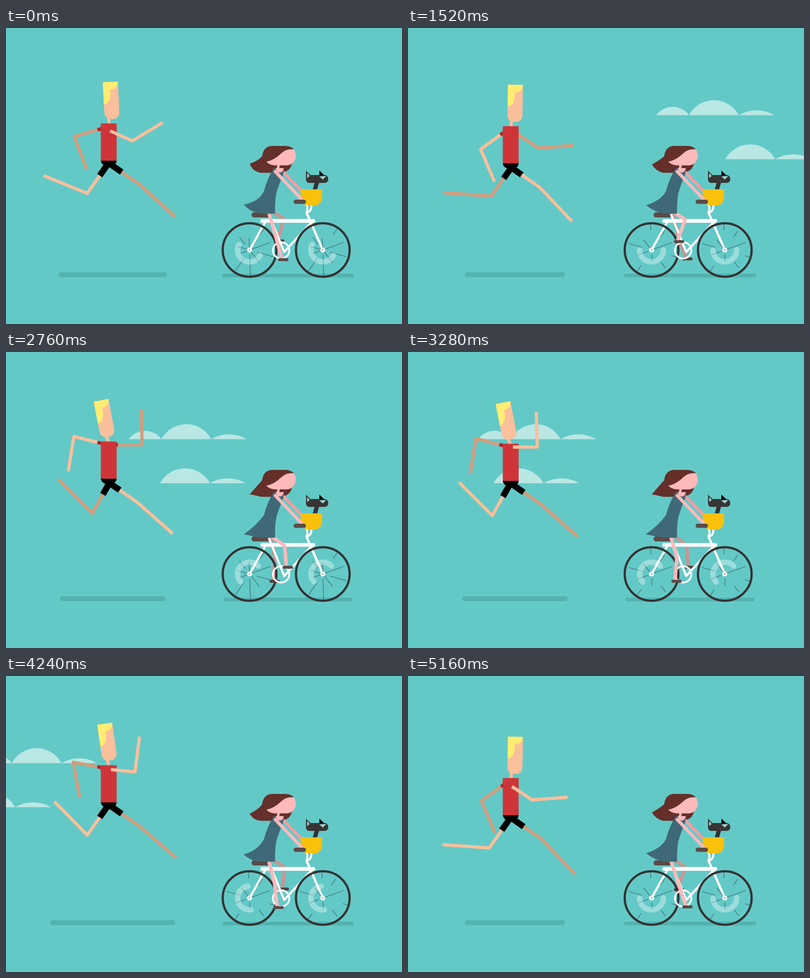
Write an HTML page with a canvas that moves like this. It is 800 by 600 pixels and loops after 5200 ms.

```html
<!DOCTYPE html>
<html lang="en">
<head>
<meta charset="utf-8">
<title>Runner and cyclist</title>
<style>
html, body { margin: 0; height: 100%; overflow: hidden; background: #63c9c7; }
canvas { display: block; }
</style>
</head>
<body>
<canvas id="stage" width="800" height="600"></canvas>
<script>
const g = document.getElementById('stage').getContext('2d');
const TAU = Math.PI * 2, LOOP = 5200, STRIDE = 1040, HALF = STRIDE / 2, STEP = 40;
const mod = (a, n) => ((a % n) + n) % n;
const rad = d => d * Math.PI / 180;
const clamp = (v, lo = -1, hi = 1) => Math.min(hi, Math.max(lo, v));
const wave = (t, peak, period = STRIDE) => Math.cos((t - peak) / period * TAU);
const pulse = (t, peak, power) => Math.max(0, wave(t, peak)) ** power;
// Point at a distance and an angle; 0 degrees hangs down, 90 points forward.
const reach = ([x, y], len, deg) => [x + len * Math.sin(rad(deg)), y + len * Math.cos(rad(deg))];

function line(points, color, width, cap = 'butt') {
  g.beginPath();
  points.forEach(p => g.lineTo(p[0], p[1]));
  g.strokeStyle = color;
  g.lineWidth = width;
  g.lineCap = cap;
  g.lineJoin = 'round';
  g.stroke();
}
function shape(d, color) {
  g.fillStyle = color;
  g.fill(new Path2D(d));
}
function pill(x, y, w, h, color, r = h / 2) {
  g.beginPath();
  g.roundRect(x, y, w, h, r);
  g.fillStyle = color;
  g.fill();
}
function ring(x, y, r, color, width, from = 0, to = TAU) {
  g.beginPath();
  g.arc(x, y, r, from, to);
  g.strokeStyle = color;
  g.lineWidth = width;
  g.lineCap = 'round';
  g.stroke();
}
function disc(x, y, r, color) {
  g.beginPath();
  g.arc(x, y, r, 0, TAU);
  g.fillStyle = color;
  g.fill();
}

function cloud(x, base, bumps) {
  g.fillStyle = '#b9e7e4';
  for (const [w, h] of bumps) {
    const c = w / 2, r = (c * c + h * h) / (2 * h), a = Math.asin(c / r);
    g.beginPath();
    g.arc(x + c, base + r - h, r, -Math.PI / 2 - a, -Math.PI / 2 + a);
    g.fill();
    x += w;
  }
}

const SKIN = '#fabf9b', SKIN_FAR = '#d39c7c', SHIRT = '#cf3538', SHIRT_FAR = '#a9262c';

// Height of the shoulder line: long in the air, short on the ground.
const bodyY = t => 208.5 - 31.5 * wave(t, 92, HALF) + 3.2 * (wave(t, 92, HALF / 2) - 1) + 4 * wave(t, 0);

function runnerLeg(t, y, near) {
  const thigh = 10 - 45 * clamp(1.75 * wave(t, 0) - .12);
  const shin = -45 - 95 * wave(t, 130) + 58 * pulse(t, 380, 2);
  const hip = [near ? 206 : 210, y + 82];
  const knee = reach(hip, 73, thigh), foot = reach(knee, 95, shin);
  const blurred = Math.abs(mod(t, STRIDE) - 360) < STEP * 1.5;
  if (blurred) {
    const rgb = near ? '250,191,155' : '211,150,120';
    const fade = g.createLinearGradient(knee[0] - 125, knee[1] + 8, knee[0], knee[1] + 48);
    fade.addColorStop(0, `rgba(${rgb},0)`);
    fade.addColorStop(1, `rgba(${rgb},.88)`);
    g.beginPath();
    g.moveTo(...knee);
    g.lineTo(...foot);
    g.lineTo(foot[0] - 130, foot[1] - 51);
    g.lineTo(knee[0] - 115, knee[1] - 33);
    g.fillStyle = fade;
    g.fill();
  }
  line(blurred ? [hip, knee] : [hip, knee, foot], near ? SKIN : SKIN_FAR, 6.5, near ? 'butt' : 'round');
  line([hip, reach(hip, 29, thigh)], '#000', 12.5);
}

function runnerArm(t, y, near, overShirt = false) {
  const upper = -8 + 99 * wave(t, 140) + 44 * pulse(t, 880, 3);
  const bend = 64 + 37 * wave(t, 105, HALF) - 20 * wave(t, -20) ** 3;
  const swing = clamp(upper / 70);
  if (near && overShirt !== swing > 0) return;
  const shoulder = [near ? 198 - 7 * swing : 205, y + 7 * Math.abs(swing)];
  const elbow = reach(shoulder, 70, upper);
  const sleeve = reach(shoulder, 21, upper);
  line([sleeve, elbow, reach(elbow, 69, upper + bend)], near ? SKIN : SKIN_FAR, 6.5, 'round');
  line([shoulder, sleeve], overShirt ? SHIRT : SHIRT_FAR, 7);
}

function runnerHead(t, y) {
  const u = mod(t - 480, HALF) / HALF;
  const tilt = 1 - 14 * (1 - (1 - u) ** 4) * Math.min(1, (1 - u) * 5);
  const chin = 211 + 5 * wave(t, 455, HALF);
  const chinY = y - 9.5 + 3 * (y - 178) / 63;
  line([[208, y + 2], [chin - 6.5, chinY - 5]], SKIN, 6);
  g.save();
  g.translate(chin, chinY);
  g.rotate(rad(tilt));
  shape('M-15.2-75.5H15.2V-15Q15.2 0 0 0Q-15.2 0-15.2-15Z', SKIN);
  shape('M-15.2-75.5H15.2Q14-60-1-60V-50Q-3-33-15.2-30Z', '#ffec73');
  g.restore();
}

function runner(t) {
  const y = bodyY(t);
  runnerArm(t + HALF, y, false);
  runnerLeg(t + HALF, y, false);
  runnerLeg(t, y, true);
  runnerArm(t, y, true);
  shape(`M191.5 ${y + 75}H223.5Q223 ${y + 86} 207 ${y + 87}Q193 ${y + 86} 191.5 ${y + 75}`, '#000');
  runnerHead(t, y);
  g.fillStyle = SHIRT;
  g.fillRect(191.5, y, 32, 75.5);
  runnerArm(t, y, true, true);
}

// Repeatable pseudo-random value from 0 to 1.
function noise(n) {
  const v = Math.sin(n * 12.9898) * 43758.5453;
  return v - Math.floor(v);
}

function wheel(x, t) {
  const y = 450, turn = rad(117 + t / HALF * 360);
  const set = Math.round(t / STEP) % 7 % 2;
  for (let i = 0; i < 10; i++) {
    const n = i + set * 10, deg = 182 - i * 36;
    const from = Math.max(0, 60 * noise(n) - 18);
    const to = Math.min(52, from + 12 + 40 * noise(n + 50));
    line([reach([x, y], from, deg), reach([x, y], to, deg)], 'rgba(50,70,75,.5)', 1.7);
  }
  ring(x, y, 24, 'rgba(255,255,255,.36)', 11, turn - Math.PI / 2, turn + Math.PI / 2);
  ring(x, y, 54.2, '#333', 4.5);
  disc(x, y, 5, '#fff');
  disc(x, y, 1.3, '#8b7772');
}

function cyclistLeg(t, near) {
  const [px, py] = reach([556, 450.5], 19.5, 12 - t / STRIDE * 360);
  const knee = [553 - 10.5 * wave(t, 100), 404 + 17 * wave(t, 20)];
  line([[near ? 529 : 532, 368], knee, [px - 3, py - 2]], near ? '#feb9ba' : '#c99592', 7);
  pill(px - 10.3, py - 3, 20.6, 6, near ? '#5b4b48' : '#54423f', 2.6);
}

function bikeFrame() {
  line([[492, 450], [525, 391]], '#fff', 4.5);
  line([[531, 377], [562, 454], [618, 393]], '#fff', 4.5);
  line([[517.5, 391], [621, 391]], '#fff', 7.5, 'round');
  line([[640, 450], [607, 374]], '#fff', 4.5);
  g.lineWidth = 4;
  g.lineCap = 'round';
  g.stroke(new Path2D('M605 354Q612 364 607 374Q617 373 617 360'));
}

function cat() {
  line([[629, 310], [623, 331]], '#333', 8.5);
  shape('M606 289L615 298H645Q651 300 651 306Q651 314 643 314H612Q606 313 606 306Z', '#383534');
  shape('M608.5 294L613.5 300L608.5 304Z', '#9ed8d0');
  shape('M633 289L643 298.5H633Z', '#000');
  shape('M633 301L647 300L640 307Z', '#9ed8d0');
}

function cyclist(t) {
  const lift = wave(t, 0, HALF), lag = wave(t, 80, HALF);
  const hairTip = 285 - 10 * lift, hemTip = 366.5 - 8.5 * lift;

  cyclistLeg(t + HALF, false);
  pill(496, 373.5, 37, 10.5, '#594a47');
  bikeFrame();
  wheel(492, t);
  wheel(640, t);
  ring(555.8, 450.7, 16.5, '#fff', 3.6);
  cyclistLeg(t, true);

  shape(`M582 247Q577 239 564 239H537Q520 240 517.5 260
    Q${505 + 6 * lag} 270 ${493 - lag} ${hairTip}
    Q${504 - 6 * lift} ${288 + 5 * lag} 515 293.5H552Q574 293 578 274Z`, '#652f2a');
  shape('M526 271Q542 268 556 254Q566 244 582 246Q586 253 585.5 262Q582 278 566 278.5H543Q532 278 526 271Z', '#feb9ba');
  line([[560, 292], [603, 337]], '#ee9fa1', 6.5);
  cat();
  shape('M595.5 327H638.5V342Q638 360 620 360H612Q596 358 595.5 342Z', '#f8c10b');
  shape(`M541 284H562Q561 297 555 309Q548 327 546 336Q543 350 543.5 376.5H518
    Q${500 - 5 * lift} ${371 + 6 * lag} ${481 - lag} ${hemTip}
    Q${507 + 4 * lift} ${350 + 3.5 * lag} 521 331Q528 304 541 284Z`, '#3f6977');
  shape('M545 284H561Q560 293 552 293Q546 291 545 284Z', '#feb9ba');
  line([[551, 276], [549, 288]], '#feb9ba', 5);
  line([[544, 291], [597, 347]], '#feb9ba', 6.5, 'round');
  pill(581, 348, 25, 8.6, '#5b4b48');
}

function shadows(t) {
  // Spreads over 280 ms and shrinks over 240 ms.
  const p = mod(t - 320, HALF);
  const wide = 134 + 119 * (p < 280 ? p / 280 : (HALF - p) / 240);
  const bikeWide = 261.9 + 5.7 * wave(t, 15, HALF);
  pill(215.8 - wide / 2, 495, wide, 10, '#53b2b0');
  pill(569.7 - bikeWide / 2, 498, bikeWide, 7.6, '#53b2b0');
}

function draw(t) {
  g.fillStyle = '#63c9c7';
  g.fillRect(0, 0, 800, 600);
  cloud(812 - .20447 * t, 176.8, [[66.5, 17], [100.5, 30.5], [72, 10]]);
  cloud(1045 - .2659 * t, 266, [[101, 30], [72, 10]]);
  shadows(t);
  runner(t);
  cyclist(t);
}

const start = performance.now();
function tick() {
  const t = (performance.now() - start) % LOOP;
  draw(Math.floor(t / STEP) * STEP);
  requestAnimationFrame(tick);
}
tick();
</script>
</body>
</html>
```
